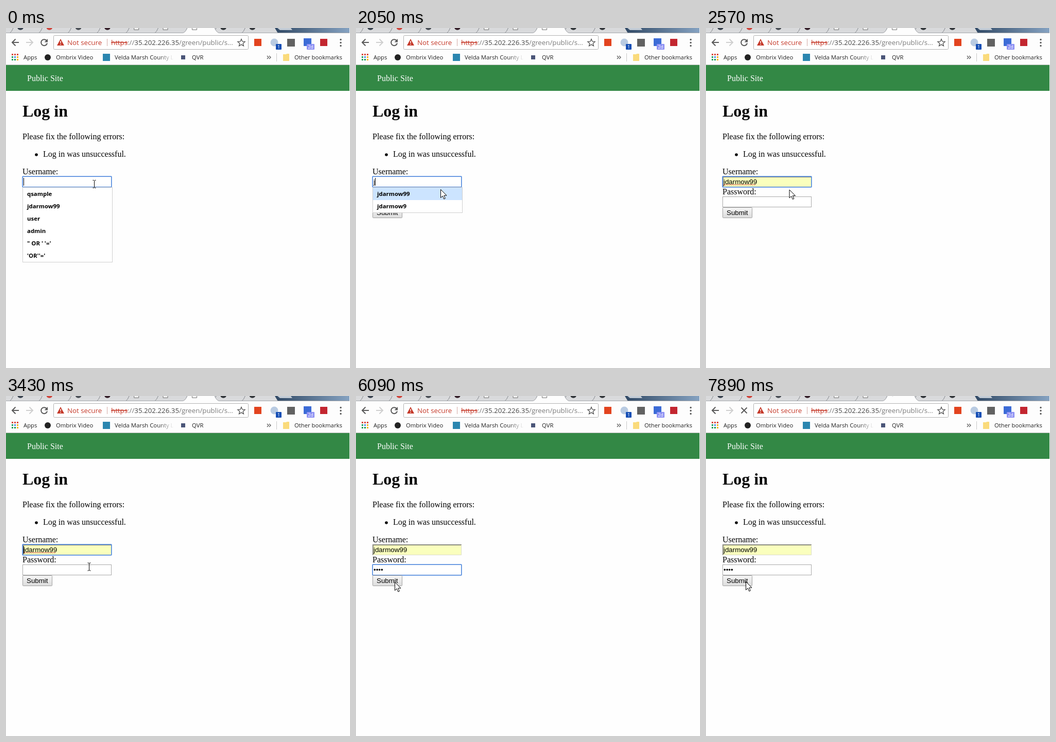
An HTML page for the animation above (8 s loop, 668x660 px).

```html
<!DOCTYPE html>
<html lang="en">
<head>
<meta charset="utf-8">
<title>Log in</title>
<style>
  html, body { margin: 0; height: 100%; overflow: hidden; background: #fefefe; }
  svg { display: block; }
  text { white-space: pre; }
  .ui { font: 11.3px "Open Sans", sans-serif; fill: #222; }
  .url { font: 13.3px "Open Sans", sans-serif; fill: #7a7a7a; }
  .badge { font: 9px "Open Sans", sans-serif; fill: #fff; text-anchor: middle; }
  .page { font: 16px "Liberation Serif", serif; }
  .field { font: 13.33px "Liberation Sans", sans-serif; }
  .option { font: bold 11.4px "Open Sans", sans-serif; }
  .line { fill: none; stroke: #5a5a5a; stroke-width: 2; }
  .ring rect { fill: none; stroke: #8db4ee; }
  .ring .inner { stroke: #4f86d8; }
</style>
</head>
<body>
<svg width="668" height="660" viewBox="0 0 668 660">
  <defs>
    <linearGradient id="glass" gradientUnits="userSpaceOnUse" x1="520" x2="668">
      <stop stop-color="#2f4763"/><stop offset="1" stop-color="#86a3c2"/>
    </linearGradient>
    <linearGradient id="fade" gradientUnits="userSpaceOnUse" x1="295" x2="326">
      <stop stop-color="#222"/><stop offset="1" stop-color="#222" stop-opacity="0"/>
    </linearGradient>
    <linearGradient id="face" x2="0" y2="1">
      <stop stop-color="#f6f6f6"/><stop offset="1" stop-color="#dcdcdc"/>
    </linearGradient>
  </defs>

  <!-- tab strip -->
  <rect width="667" height="10" fill="url(#glass)"/>
  <path d="M0 0H522L528 10H0Z" fill="#d9dadc"/>
  <path d="M527 0H553L556 4H532Z" fill="#c3ccd6"/>
  <g id="tabs"></g>
  <path d="M343 10Q348 9 352 0H405Q409 9 414 10Z" fill="#fdfdfd"/>
  <path d="M0 9.500H343Q348 9 352 0M405 0Q409 9 414 9.500H667" fill="none" stroke="#a2a5aa"/>
  <path id="doc" d="M361.500 0V3.500H370.500V0" fill="#fff" stroke="#777"/>
  <circle id="spinner" cx="366" cy="-3.500" r="5.500" fill="none" stroke="#e4e6e9" stroke-width="1.500" stroke-dasharray="25 10"/>

  <!-- toolbar -->
  <rect y="10" width="667" height="62" fill="#fdfdfd"/>
  <path class="line" d="M25 28H12M18.500 21.500L12 28L18.500 34.500"/>
  <path class="line" d="M39 28H52M45.500 21.500L52 28L45.500 34.500" style="stroke:#cfcfcf"/>
  <g id="reload">
    <path class="line" d="M78.500 24A6 6 0 1 0 80 29.500"/>
    <path d="M81 21V27.500H74.500Z" fill="#5a5a5a"/>
  </g>
  <path id="stop" class="line" d="M68.500 22.500L79.500 33.500M79.500 22.500L68.500 33.500"/>
  <rect x="92.500" y="14.500" width="378" height="27" rx="2" fill="#fff" stroke="#b2b2b2"/>
  <path d="M106 21L113 34H99Z" fill="#c53929"/>
  <path d="M106 25V29.500M106 31V32.500" stroke="#fff" stroke-width="1.500"/>
  <text class="url" x="119" y="33" style="fill:#c53929">Not secure</text>
  <path d="M196.500 21V35" stroke="#d2a9a4"/>
  <text class="url" x="204" y="33"><tspan fill="#c53929" text-decoration="line-through">https</tspan>://<tspan fill="#444">35.202.226.35</tspan>/green/public/s...</text>
  <path class="line" style="stroke-width:1.400" d="M457 21.500L459 26.200L464 26.600L460.200 29.900L461.400 34.700L457 32.100L452.600 34.700L453.800 29.900L450 26.600L455 26.200Z"/>
  <rect x="482" y="21" width="14" height="14" fill="#e2431e"/>
  <circle cx="521" cy="28" r="7.500" fill="#b9cbe2"/>
  <rect x="524" y="31" width="11" height="11" rx="1" fill="#164fb5"/>
  <text class="badge" x="529.500" y="40">1</text>
  <rect x="546" y="21" width="15" height="15" fill="#626262"/>
  <rect x="578" y="20" width="15" height="15" fill="#3c6bd6"/>
  <rect x="584" y="31" width="15" height="11" rx="1" fill="#8d90f3"/>
  <text class="badge" x="591.500" y="40">2d</text>
  <rect x="610" y="21" width="14" height="14" fill="#c3262f"/>
  <g fill="#5a5a5a"><circle cx="650" cy="22.500" r="1.700"/><circle cx="650" cy="28.500" r="1.700"/><circle cx="650" cy="34.500" r="1.700"/></g>

  <!-- bookmarks -->
  <g id="apps"></g>
  <text class="ui" x="34" y="61">Apps</text>
  <circle cx="81" cy="57" r="6" fill="#222"/>
  <text class="ui" x="97" y="61">Ombrix Video</text>
  <rect x="188" y="50" width="14" height="14" fill="#2b86b0"/>
  <text class="ui" x="211" y="61" style="fill:url(#fade)">Velda Marsh County Li</text>
  <rect x="340" y="53" width="8" height="8" fill="#4a5578"/>
  <text class="ui" x="361" y="61">QVR</text>
  <path class="line" style="stroke-width:1.300" d="M507 54L510 57L507 60M511 54L514 57L511 60"/>
  <path d="M525.500 49V65" stroke="#c8c8c8"/>
  <path d="M538 51H544L545 50H550V64H538Z" fill="#fadb7c"/>
  <text class="ui" x="560" y="61">Other bookmarks</text>

  <!-- page -->
  <path d="M0 71.500H667" stroke="#b9bdb9"/>
  <rect y="72" width="667" height="50" fill="#338845"/>
  <g class="page">
    <text x="41" y="103" fill="#fff">Public Site</text>
    <text x="32" y="172" font-size="32" font-weight="bold">Log in</text>
    <text x="32" y="216">Please fix the following errors:</text>
    <circle cx="59" cy="246" r="2.800"/>
    <text x="72" y="250">Log in was unsuccessful.</text>
    <text x="32" y="284">Username:</text>
    <text x="32" y="323">Password:</text>
  </g>

  <rect id="userBox" x="32" y="288" width="173" height="21"/>
  <g id="userInset" fill="none" stroke-width="2">
    <path d="M33 309V289H205" stroke="#8b8b80"/>
    <path d="M33 308.500H204.500V289" stroke="#dcdccb" stroke-width="1"/>
  </g>
  <g id="userRing" class="ring">
    <rect x="31.500" y="287.500" width="174" height="22" rx="1.500"/>
    <rect class="inner" x="32.500" y="288.500" width="172" height="20"/>
  </g>
  <text id="userText" class="field" x="34" y="303"></text>
  <path id="squiggle" fill="none" stroke="#e05a4a"/>

  <rect x="32.500" y="327.500" width="172" height="20" fill="#fff" stroke="#a9a9a9"/>
  <g id="passRing" class="ring">
    <rect x="31.500" y="326.500" width="174" height="22" rx="1.500"/>
    <rect class="inner" x="32.500" y="327.500" width="172" height="20"/>
  </g>
  <text id="passText" class="field" x="34" y="342"></text>

  <rect id="button" x="32.500" y="348.500" width="57" height="20" rx="1" stroke="#a2a2a2"/>
  <text class="field" x="40" y="363">Submit</text>

  <rect id="caret" width="1" height="15"/>
  <g id="fullList"></g>
  <g id="shortList"></g>

  <path id="beam" d="M-3 -7.500H-1L0 -6.500L1 -7.500H3M0 -6.500V6.500M-3 7.500H-1L0 6.500L1 7.500H3" fill="none" stroke="#000"/>
  <path id="arrow" d="M0 0V16L3.700 12.500L6.300 18.500L8.800 17.400L6.300 11.600H11.500Z" fill="#fff" stroke="#000"/>
</svg>

<script>
const LOOP = 8000;
const NAME = "jdarmow99";
const $ = id => document.getElementById(id);
const show = (id, on) => $(id).style.display = on ? "" : "none";
const within = (t, from, to) => t >= from && t < to;

// Latest entry [time, ...values] already reached
const latest = (track, t) => track.filter(step => step[0] <= t).pop();

const mouse = [
  [0, 171, 302.5, "beam"], [1890, 168, 311, "arrow"], [2040, 164, 313, "arrow"],
  [2180, 161.5, 313.5, "arrow"], [3300, 161, 331, "beam"], [3680, 161, 332, "beam"],
  [5550, 160, 339, "beam"], [5690, 153, 368, "arrow"], [5830, 124, 392, "arrow"],
  [5950, 95, 386, "arrow"], [6090, 75, 361, "arrow"], [6230, 77, 360, "arrow"]
];
const typedName = [[0, ""], [740, "j"], [2180, NAME]];
const typedDots = [[0, 0], [4420, 1], [4700, 2], [4990, 3], [5410, 4]];
// Caret position, or null while it is blinked off
const carets = [
  [0, 34, 291], [150, null], [740, 37, 291], [1170, null], [1750, 37, 291], [2180, null],
  [3170, 34, 291], [3680, 34, 330], [4120, null], [4420, 39, 330], [4700, 43, 330],
  [4990, 48, 330], [5410, 53, 330], [5950, null]
];

function fillList(id, names) {
  const rows = names.map((name, i) =>
    `<text class="option" x="41" y="${326 + 24 * i}">${name}</text>`).join("");
  $(id).innerHTML = `<rect x="32.5" y="309.5" width="174" height="${names.length * 24 + 1}" fill="#fff" stroke="#cfcfcf"/>
    <rect class="hover" x="33" y="310" width="173" height="24" fill="#cce4ff"/>${rows}`;
}

function buildStatic() {
  fillList("fullList", ["qsample", NAME, "user", "admin", `" OR ' '='`, `'OR''='`]);
  fillList("shortList", [NAME, NAME.slice(0, -1)]);

  const colors = ["#db4437", "#db4437", "#db4437", "#0f9d58", "#4285f4", "#f4b400", "#0f9d58", "#0f9d58", "#f4b400"];
  $("apps").innerHTML = colors.map((c, i) =>
    `<rect x="${11 + i % 3 * 5}" y="${50 + Math.floor(i / 3) * 5}" width="3" height="3" fill="${c}"/>`).join("");

  // An empty colour stands for a blank document icon
  const icons = ["#39434f", "#d0453c", "#4b5057", "#35202a", "", "", "", "#33373b", "#33373b"];
  $("tabs").innerHTML = icons.map((c, i) => {
    const x = 28 + 56.3 * i;
    const icon = c ? `<circle cx="${x}" cy="-2" r="6" fill="${c}"/>`
                   : `<path d="M${x - 4.5} 0V3.5H${x + 4.5}V0" fill="#eee" stroke="#777"/>`;
    return `<path d="M${x - 21} 10Q${x - 17} 8 ${x - 14} 0" fill="none" stroke="#85888d"/>${icon}`;
  }).join("");

  let wave = "M34 305";
  for (let x = 36; x <= 97; x += 2) wave += `L${x} ${x % 4 ? 305 : 303.5}`;
  $("squiggle").setAttribute("d", wave);
}

function draw(t) {
  const loading = t >= 6380;
  show("doc", !loading);
  show("reload", !loading);
  show("stop", loading);
  show("spinner", loading);
  const tick = Math.max(0, Math.floor((t - 6670) / 140));
  $("spinner").setAttribute("transform", `rotate(${-30 * tick} 366 -3.5)`);

  const filled = t >= 2180;
  $("userText").textContent = latest(typedName, t)[1];
  $("userBox").setAttribute("fill", filled ? "#faffbd" : "#fff");
  show("userInset", filled);
  show("userRing", t < 3680);
  show("squiggle", within(t, 2570, 3680));

  $("passText").textContent = "•".repeat(latest(typedDots, t)[1]);
  show("passRing", within(t, 3680, 6230));
  $("button").setAttribute("fill", within(t, 6230, 6380) ? "#d9d9d9" : "url(#face)");

  show("fullList", t < 740);
  show("shortList", within(t, 740, 2570));
  document.querySelectorAll(".hover").forEach(row =>
    row.style.display = within(t, 1890, 2570) ? "" : "none");

  const [, caretX, caretY] = latest(carets, t);
  show("caret", caretX !== null);
  if (caretX !== null) $("caret").setAttribute("transform", `translate(${caretX} ${caretY})`);

  const [, x, y, shape] = latest(mouse, t);
  for (const id of ["beam", "arrow"]) {
    show(id, id === shape);
    $(id).setAttribute("transform", `translate(${x + .5} ${y + .5})`);
  }
}

buildStatic();
const start = performance.now();
function frame() {
  draw((performance.now() - start) % LOOP);
  requestAnimationFrame(frame);
}
frame();
</script>
</body>
</html>
```
